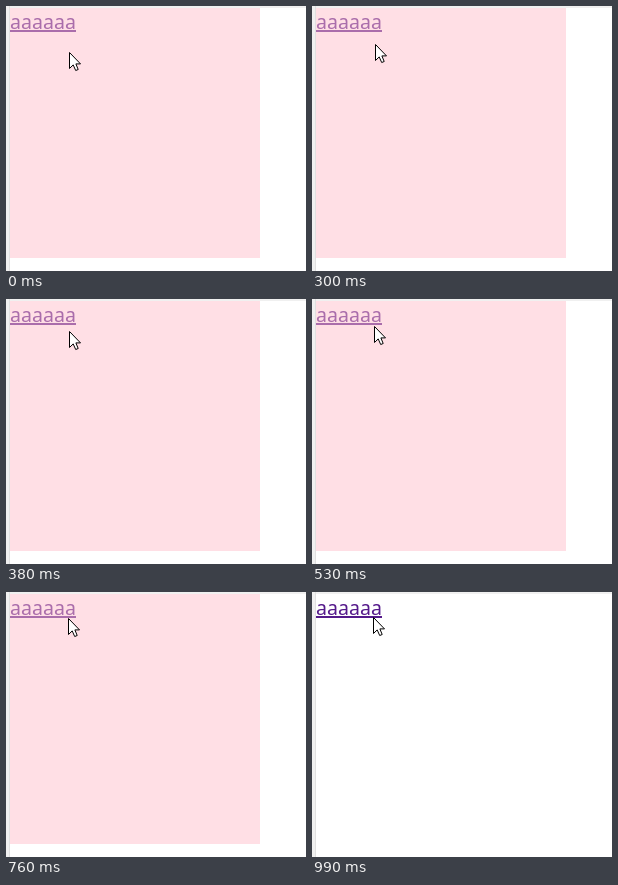
An HTML page that plays this animation: 300 by 265 pixels, repeating every 1540 ms.

```html
<!DOCTYPE html>
<html lang="en">
<head>
<meta charset="utf-8">
<title>Overlay click</title>
<style>
  html, body { margin: 0; width: 100%; height: 100%; overflow: hidden; background: #fff; }

  .stage { position: relative; width: 300px; height: 265px; overflow: hidden; background: #fff; }
  .stage > * { position: absolute; }

  .top { left: 0; top: 0; width: 300px; height: 2px; background: #f0f0f0; }
  .side { left: 0; top: 0; width: 3px; height: 265px; background: #f0f0f0; border-right: 1px solid #e0e0e0; }

  .link {
    left: 4px; top: 2px;
    font: 19.6px/28px "Noto Sans", "Open Sans", sans-serif;
    color: #551a8b;
    white-space: nowrap;
  }
  .link::after {
    content: ""; position: absolute; left: 0; top: 22px;
    width: 100%; height: 1.5px; background: #551a8b;
  }

  .cover {
    left: 4px; top: 2px; width: 250px; height: 250px;
    background: pink; opacity: .5;
    animation: cover 1540ms step-end infinite;
  }
  .ring {
    left: 47px; top: 11px; width: 30px; height: 30px;
    border-radius: 50%; background: rgba(255, 255, 0, .47);
    animation: ring 1540ms step-end infinite;
  }
  .cursor {
    left: 0; top: 0; width: 12px; height: 19px; overflow: visible;
    animation: move 1540ms step-end infinite;
  }

  @keyframes cover {
    0% { opacity: .5; }
    64.2857%, 100% { opacity: 0; }
  }
  @keyframes ring {
    0% { opacity: 0; }
    54.5455% { opacity: 1; }
    64.2857%, 100% { opacity: 0; }
  }
  @keyframes move {
    0% { transform: translate(63px, 46px); }
    14.2857% { transform: translate(63px, 43px); }
    19.4805% { transform: translate(63px, 38px); }
    24.6753% { transform: translate(63px, 32px); }
    29.2208% { transform: translate(63px, 29px); }
    34.4156% { transform: translate(62px, 27px); }
    49.3506% { transform: translate(62px, 26px); }
    64.2857%, 100% { transform: translate(61px, 25px); }
  }
</style>
</head>
<body>
<div class="stage">
  <div class="top"></div>
  <div class="side"></div>
  <div class="link">aaaaaa</div>
  <div class="cover"></div>
  <div class="ring"></div>
  <svg class="cursor" viewBox="0 0 12 19">
    <path d="M.5 .5V16.5L4.2 12.9L6.7 18.5L9.2 17.5L6.9 11.9H11.5Z" fill="#fff" stroke="#000"/>
  </svg>
</div>
</body>
</html>
```
